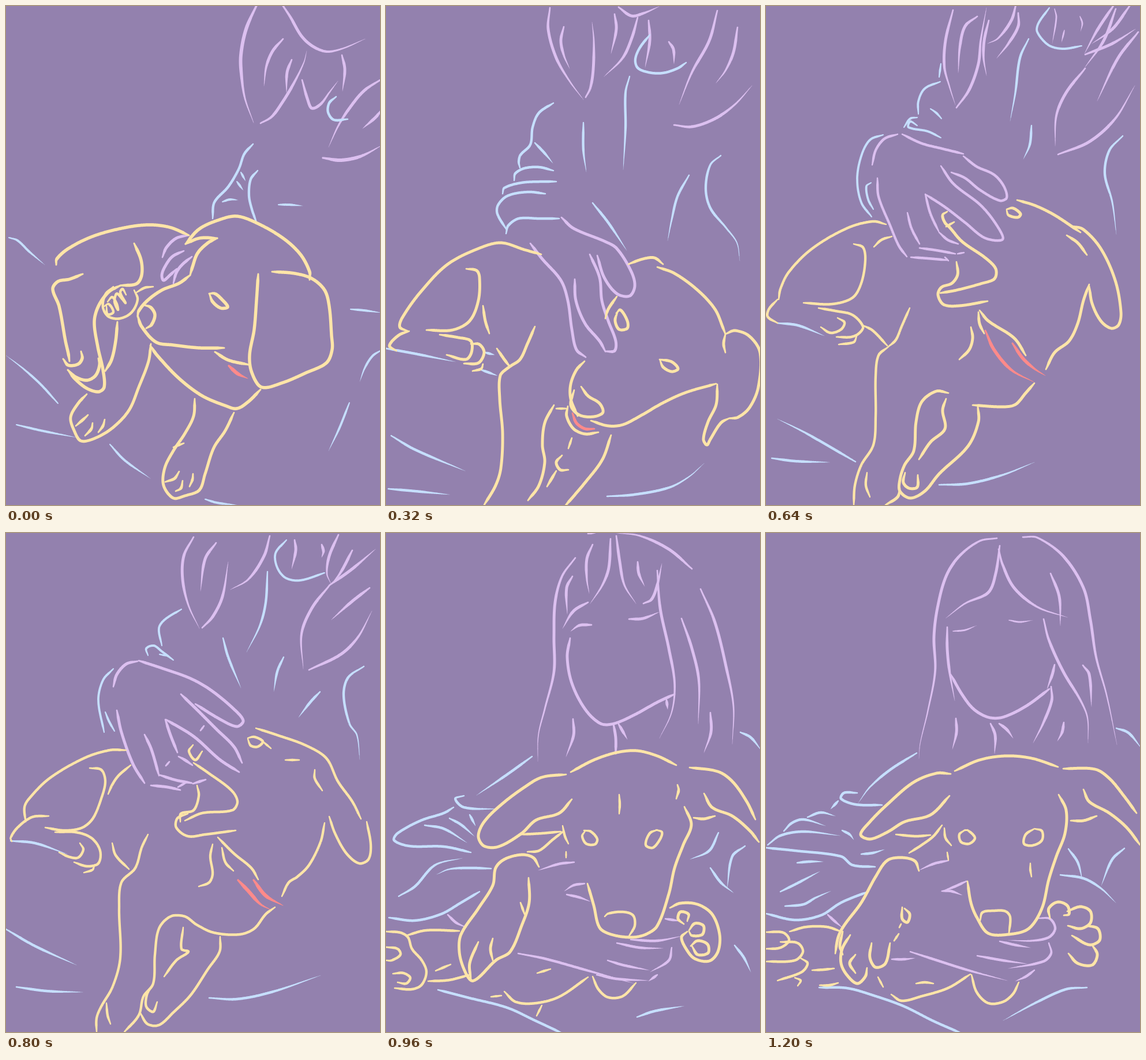
These frames come from a looping animation (648x864 px, 1.28 s). An HTML page with a canvas:

```html
<!DOCTYPE html>
<html lang="en">
<head>
<meta charset="utf-8">
<title>Dog and owner</title>
<style>
html, body { margin: 0; width: 100%; height: 100%; overflow: hidden; background: #9381ae; }
canvas { display: block; width: 648px; height: 864px; }
</style>
</head>
<body>
<canvas id="stage" width="648" height="864"></canvas>
<script>
const ctx = document.getElementById('stage').getContext('2d');
const STEP = 80, STEPS = 16;
let boil = 0; // redraw wobble, 0 = steady

// Slight line boil so held poses feel redrawn
const wob = ([x, y]) => boil
  ? [x + 1.5 * Math.sin(y / 60 + boil * 2.1), y + 1.5 * Math.sin(x / 70 + boil * 3.7)]
  : [x, y];

// Smooth curve through the points, sampled about once per pixel
function curve(nums) {
  const p = [], out = [];
  for (let i = 0; i < nums.length; i += 2) p.push(wob([nums[i], nums[i + 1]]));
  const dist = (a, b) => Math.hypot(b[0] - a[0], b[1] - a[1]) || 1;
  const tangent = i => {
    const a = p[Math.max(i - 1, 0)], b = p[i], c = p[Math.min(i + 1, p.length - 1)];
    const d = (a === b ? 0 : dist(a, b)) + (b === c ? 0 : dist(b, c));
    return [(c[0] - a[0]) / d, (c[1] - a[1]) / d];
  };
  for (let i = 0; i < p.length - 1; i++) {
    const d = dist(p[i], p[i + 1]), m = tangent(i), n = tangent(i + 1), k = Math.ceil(d);
    for (let j = 0; j < k; j++) {
      const t = j / k, t2 = t * t, t3 = t2 * t;
      out.push([0, 1].map(c =>
        (2 * t3 - 3 * t2 + 1) * p[i][c] + (t3 - 2 * t2 + t) * d * m[c] +
        (3 * t2 - 2 * t3) * p[i + 1][c] + (t3 - t2) * d * n[c]));
    }
  }
  out.push(p[p.length - 1]);
  return out;
}

// Brush: tail = 1 thins out toward the end, tail = 0 stays even
const brush = color => (width, tail, ...strokes) => {
  ctx.fillStyle = color;
  for (const s of strokes) {
    const pts = curve(s), n = pts.length - 1;
    ctx.beginPath();
    pts.forEach(([x, y], i) => {
      const left = n - i;
      const head = 0.55 + 0.45 * Math.min(1, i / (tail ? 1 + n * 0.2 : 12));
      const end = tail
        ? 0.15 + 0.85 * Math.min(1, left / (1 + n * 0.45))
        : 0.55 + 0.45 * Math.min(1, left / 12);
      const r = width / 2 * Math.min(head, end);
      ctx.moveTo(x + r, y);
      ctx.arc(x, y, r, 0, 7);
    });
    ctx.fill();
  }
};
const gold = brush('#ffe5a8'), lilac = brush('#dcc0f0'), blue = brush('#c6dfff'), red = brush('#ff8a8a');

function resting() {
  // hair and chin
  lilac(6, 1, [436,-5,416,40,407,85,408,120,414,160,429,202], [549,263,580,267,615,260,650,242]);
  lilac(5, 1, [476,-6,492,18,512,52,532,70,556,79,585,73,622,57], [480,57,462,78,451,105,447,138],
    [495,93,487,115,486,150], [441,203,460,192,478,168,498,135,516,98,521,78],
    [513,128,522,160,530,177,545,170,560,150,575,130], [582,85,587,110,583,147],
    [650,127,620,147,595,177,576,207,559,244], [650,181,640,193,618,212]);
  // fingers
  lilac(5, 0, [316,397,295,402,278,418,271,435], [308,424,288,434,275,452,270,466,273,475,284,466,296,455],
    [322,434,305,448,295,462,290,480]);
  blue(4.5, 0, [428,239,413,256,403,283,385,313,361,340,358,368], [436,285,424,300,421,328,426,352,434,375],
    [572,157,560,168,558,184,568,197,592,196]);
  blue(4, 1, [407,288,415,303], [400,304,411,319], [375,339,388,335,402,336], [472,344,490,344,514,346],
    [5,401,20,406,40,425,67,448], [597,525,620,527,650,531], [650,596,635,606,622,626,613,650],
    [595,687,578,730,559,770], [90,688,60,655,30,628,0,605], [18,725,60,735,122,747],
    [180,759,205,786,250,818], [345,854,365,860,400,864]);
  // body and hind leg
  gold(5.5, 0, [87,448,88,438,108,420,150,399,200,385,245,379,283,383,317,397], [222,411,234,440,235,466,226,481,198,484],
    [198,484,178,495,160,520,153,547,159,590,168,630,170,660,160,668,140,662,120,646,108,631],
    [133,464,110,473,90,477,81,490,92,520,103,580,108,602,110,615],
    [99,611,108,622,125,620,132,610,130,598], [107,630,120,642,140,648,155,640,162,622,160,610],
    [193,547,190,580,183,612,172,632]);
  gold(4.5, 0, [222,492,228,508,218,530,198,541,178,538,168,522,172,500,186,486],
    [170,520,178,516,186,530,176,534,174,520],
    [176,512,184,504,192,516,194,526,188,512,192,498,202,508,207,514,198,496,202,490,208,500],
    [226,496,240,488,255,486]);
  // head
  gold(5.5, 0, [311,412,335,386,370,370,400,364,435,376,480,402,510,430,526,460,526,474],
    [311,412,335,402,366,402], [366,402,350,410,332,428,323,452,319,466],
    [319,466,300,480,270,492,245,510,230,528,228,538], [240,518,251,522,258,535,252,552,243,558],
    [228,536,235,555,260,582,290,587,335,592,378,592],
    [352,498,362,498,374,508,384,521,372,523,358,512,353,500]);
  gold(5.5, 0, [437,464,434,510,430,560,422,605,426,635,443,660,480,652,520,635,555,618,565,595,564,570,560,520,552,492,530,472,500,463,461,460],
    [362,599,385,613,420,621], [250,588,262,605,300,645,340,675,380,692,400,697,420,685,441,664]);
  // front legs
  gold(5, 0, [251,585,247,615,230,660,213,700,185,730,155,748,130,753,118,735,112,712,125,688,140,672],
    [121,727,138,712,142,708], [137,744,148,732,150,722], [160,738,168,727,171,716],
    [327,680,325,710,310,740,290,770,275,800,273,830,290,852,310,848,335,838,345,810,360,765,380,735,395,704],
    [290,764,308,757], [276,824,292,818,300,806], [294,840,303,835,306,822], [318,832,323,820,324,810]);
  red(6, 1, [386,623,402,637,419,645]);
}

function petA() {
  lilac(5, 1, [284,3,281,40,295,90,318,130,342,162], [308,36,303,60,308,85,318,108],
    [346,158,354,142,359,110,360,60,357,28], [396,14,399,40,390,82], [436,20,426,55,410,90,378,122],
    [403,2,425,17,445,13,473,1], [455,25,457,60,449,106], [490,62,498,75,499,100],
    [574,8,560,60,530,115,508,170], [609,37,602,80,588,112,572,133], [499,206,530,209,570,195,605,170,634,138]);
  // hand
  lilac(5, 0, [304,366,325,385,380,408,400,420,425,460,431,485,422,502,400,498,378,470,366,432],
    [353,430,370,470,374,510,385,545,398,580,396,597,380,598], [327,473,329,510,345,550,370,580,380,598],
    [250,411,270,437,303,475,315,510,322,560,330,595,346,608]);
  // sleeve
  blue(4.5, 0, [290,168,265,185,254,210,250,240,233,258,230,270,232,280], [222,302,224,290,240,281,265,279,290,285],
    [202,325,205,315,235,306,270,304,295,304], [276,325,245,322,210,329,194,345,193,360,208,386],
    [208,394,212,380,230,368,265,368,300,368], [457,50,440,72,432,92,436,107,455,115,480,116,505,108,520,98]);
  blue(4.5, 1, [258,237,275,255,289,272], [342,202,342,250,347,287], [422,122,415,150,415,210,411,283],
    [358,341,385,375,417,423], [525,293,505,330,495,370,488,406],
    [580,259,562,275,554,315,562,350,590,385,608,410,613,441], [-5,592,50,602,120,616], [172,600,188,604],
    [165,630,193,640], [9,744,50,768,137,805], [4,836,50,840,110,846], [383,849,430,846,490,834,525,815,551,792]);
  // body
  gold(5, 0, [269,430,240,422,200,410,165,418,107,447,60,495,28,540,24,556,38,563], [40,563,22,570,6,588,18,597],
    [139,455,157,458,162,470,160,510,145,545,115,561,70,561], [93,569,125,574,147,580,148,600,138,612,105,604],
    [147,585,162,586,170,600,160,618,135,619], [150,632,165,628,168,620], [168,519,172,545,179,567],
    [192,593,205,612,215,625], [258,555,245,585,232,612,212,626,198,640,197,680,202,740,199,800,190,830,170,864]);
  // head
  gold(5, 0, [380,541,385,525,400,503], [420,447,445,438,465,436,480,447], [470,452,500,463,540,492,570,525,585,560,588,568],
    [588,568,605,562,630,572,648,600,645,660,630,695,610,712,594,714], [588,568,585,585,588,600],
    [594,714,580,722,562,750,556,760,550,750,558,720,572,690,574,655],
    [572,654,520,669,480,687,440,710,410,725,385,727,355,718],
    [399,532,406,526,418,545,418,558,404,560,397,545,401,530], [474,612,495,616,506,628,495,633,480,625,475,614]);
  gold(5, 0, [344,615,330,630,320,655,320,680,332,710],
    [338,659,350,675,370,688,376,703,365,710,345,711,330,705,320,690,326,665],
    [315,693,313,710,325,732,345,741,368,738], [295,697,312,697], [291,691,275,722,271,760,275,790,265,830,246,856],
    [390,743,375,785,345,825,310,866], [322,748,316,766], [305,778,295,790,302,803,316,803], [295,805,286,820,279,832]);
  red(5, 0, [323,705,330,722,345,732,361,732]);
}

function petB() {
  lilac(5, 1, [287,-2,273,35,272,80,285,130,304,163], [328,25,313,45,309,70,312,98], [319,167,345,135,358,100,359,42],
    [362,117,390,105,410,70,423,35], [403,-2,425,17,445,18,482,5], [452,22,458,60,453,99], [504,42,504,55,497,72],
    [566,18,555,65,520,125,480,185,473,222], [605,65,595,105,565,138], [483,223,530,223,590,195,630,148]);
  // hand
  lilac(5, 0, [307,375,325,384,352,404], [364,404,395,417,420,448,427,480,418,500,398,500,370,465,344,422],
    [327,455,321,490,340,540,362,580,385,596,396,585,380,545,369,500,373,470],
    [251,411,280,438,300,475,315,520,328,570,333,588,352,598]);
  // sleeve
  blue(5, 0, [286,153,280,175,258,205,250,225,258,245,287,261], [250,236,238,245,240,258,260,268,289,273],
    [236,262,230,270,240,282,265,289,285,290], [230,280,222,295,220,305],
    [270,305,235,306,205,320,191,340,200,362,212,378], [214,402,208,385,220,367,250,363,312,363],
    [262,322,285,321,303,333], [244,336,230,343,222,358], [437,62,412,80,405,100,415,120,435,131,470,124,510,105,540,75]);
  blue(5, 1, [295,224,306,260,305,290,298,324], [368,255,354,275,353,320,371,374], [410,137,414,180,415,260,408,331],
    [568,298,562,325,575,355,598,400,604,482], [507,365,485,375,472,395,463,420], [0,735,40,750,148,810],
    [0,832,50,842,132,844], [363,847,410,856,470,850,520,830,567,794], [15,595,50,600,95,614], [100,617,145,631],
    [172,609,202,616], [165,640,195,648]);
  // body
  gold(5, 0, [257,420,205,410,170,414,120,438,82,461,50,505,30,535,26,555], [82,542,60,547,35,550,10,575,4,590,14,595],
    [150,460,165,475,160,510,148,550,125,560,90,563,66,567], [70,567,105,570,140,575,148,595,138,612,100,612],
    [148,580,165,585,176,600,165,617,135,620], [158,620,174,615,176,630,165,640,150,637], [188,597,200,612,215,622],
    [258,547,245,585,228,615,205,633,199,655,207,700,206,770,195,820,172,864]);
  // head
  gold(5, 0, [411,451,430,438,460,436,485,450,475,451], [470,453,500,460,540,485,570,520,590,562],
    [577,566,600,563,622,578,632,605,625,660,615,690,588,712],
    [575,630,572,650,579,685,570,710,555,740,554,758,562,752,570,735,585,727],
    [563,659,520,670,480,690,440,715,400,730,370,732,345,728],
    [400,531,396,548,408,562,422,557,418,540,404,528], [503,634,485,630,468,615,483,610,498,620,504,628]);
  gold(5, 0, [345,607,328,630,317,660,320,690,330,710], [330,660,350,670,365,690,380,708,372,715,345,712,326,695,324,668,330,660],
    [315,697,313,712,325,733,345,742,366,737], [313,697,290,700,278,715,277,760,273,800,260,830,248,858,264,848],
    [324,745,322,770,305,785,302,797,312,800], [302,797,285,805,272,830,268,850,274,862], [391,743,375,785,345,825,310,866]);
  red(5, 0, [323,707,332,720,348,726]);
}

function playA() {
  lilac(5, 1, [324,7,311,60,309,105,318,140,328,171], [366,18,345,35,336,70,333,115], [330,176,352,145,368,100,372,60,382,3],
    [386,25,378,60,377,90,382,120], [433,-2,425,25,402,56,384,65], [437,12,437,35,420,65,400,90],
    [603,-2,575,40,552,82], [630,0,600,40,565,65], [553,84,600,65,640,40], [606,5,585,60,552,107],
    [553,108,520,150,503,190,501,242], [645,45,610,90,574,164], [506,257,560,235,605,195,639,138]);
  lilac(3, 1, [500,5,503,20,496,65], [517,42,512,63], [544,18,548,30,545,44]);
  // hand
  lilac(4.5, 0, [184,275,190,250,205,230,228,222], [236,222,270,238,305,247,342,256],
    [342,260,365,278,395,292,412,312,417,332,405,337,370,318,345,298,321,288],
    [303,277,325,308,372,345,400,380,410,404,380,402,345,375,310,348,276,326], [276,326,285,360,299,390],
    [193,298,195,330,215,380,230,415,244,434], [245,358,252,385,266,412], [251,435,280,437,314,440],
    [266,419,295,423,328,429], [300,392,315,405,333,412], [332,429,343,427], [310,435,316,441]);
  blue(4, 0, [303,100,300,123], [302,131,275,143,264,165,264,187], [239,210,250,195,262,193],
    [262,207,250,200,247,210,280,217,303,228], [285,178,295,185,304,195], [203,223,180,232,165,260,158,300,165,340,183,365],
    [182,306,174,312,177,335,186,352], [491,3,472,30,470,45,490,68,515,74,547,69]);
  blue(4.5, 1, [455,57,440,90,432,150,423,199], [460,207,457,240,446,265], [618,225,595,250,587,290,600,340,607,395],
    [20,549,55,553,101,571], [155,789,70,740,20,715], [10,783,50,788,110,790], [300,829,350,827,410,812,465,790]);
  // body
  gold(4.5, 0, [208,378,185,373,140,385,80,420,40,460,25,490,22,508], [20,508,5,525,3,538,20,549],
    [152,412,168,418,172,440,165,480,150,505,115,516,65,514], [91,523,120,528,150,535,168,555,162,566,148,573,122,573],
    [124,540,136,548,130,560,112,566,95,556], [157,572,152,582,126,586], [218,399,200,405,187,417],
    [249,523,235,555,225,578,212,590], [168,553,185,562,210,588],
    [212,590,195,605,190,640,190,710,186,760,165,795,154,830,152,864], [175,808,173,830,180,850]);
  // head
  gold(5, 0, [435,336,465,345,500,362,545,392], [530,381,550,387,580,420,605,475,615,530,611,552,598,558,580,545,565,515,560,485],
    [521,397,540,410,556,431], [560,482,550,510,540,550,525,580,500,600,485,629], [417,352,428,350,441,360,436,366,420,362,417,354],
    [314,356,306,362,310,375,318,383,340,408,380,436,398,455,396,472,375,480,330,492,302,497], [312,382,326,374],
    [330,443,332,465,322,480,304,487,298,500,308,517,335,519,384,511],
    [370,527,385,545,430,575,450,605], [368,530,370,550,378,567], [355,556,358,575,352,595,335,612]);
  // front legs
  gold(5, 0, [465,653,450,670,432,690,410,694,358,691],
    [316,670,295,667,270,685,260,720,256,770,240,795,232,820,232,840,250,852,275,840,300,810,350,762,368,720,367,693],
    [312,680,306,700,310,732,285,755,265,785], [241,808,238,825,248,835,262,833,263,812], [232,835,228,850,207,864]);
  red(5.5, 1, [380,562,395,595,425,630,464,651], [427,584,445,610,465,628,484,640]);
}

function playB() {
  lilac(5, 1, [325,7,308,40,306,80,316,125,335,165], [364,17,345,45,337,100], [340,164,358,145,375,110,385,50],
    [457,5,447,40,420,80,389,98], [500,12,502,30,495,62], [547,20,550,32,547,42], [576,3,560,40,556,70,563,88],
    [600,30,580,68,563,90], [561,90,600,62,640,28], [561,90,530,130,512,175,515,235], [630,95,600,118,564,150],
    [525,237,580,210,610,180,634,135]);
  // hand
  lilac(5, 0, [186,266,192,245,208,227,228,222],
    [230,221,270,234,320,252,355,272,395,305,411,325,400,335,370,322,328,296],
    [303,279,330,305,365,340,395,370,409,398], [404,414,370,392,325,352,277,323], [276,323,285,350,297,380],
    [192,307,200,345,220,400,240,433], [240,349,252,375,265,420], [251,437,280,440,302,445], [266,419,295,428,322,433],
    [299,387,310,393,323,402], [298,440,312,432], [343,334,337,342], [283,396,277,403], [324,434,346,427]);
  blue(4, 0, [304,132,275,150,265,165,270,195], [246,212,243,200,256,195,270,205,290,220], [266,210,280,213],
    [186,235,168,255,160,290,170,345], [172,310,178,325,188,343], [486,12,467,35,470,60,485,78,510,82,552,69]);
  blue(4.5, 1, [453,67,450,120,440,160,417,206], [376,182,385,215,407,268], [481,215,470,240,464,274], [544,275,528,292,507,319],
    [620,231,593,250,585,280,595,330,608,350,613,392], [8,533,50,537,106,556], [0,686,50,715,122,748],
    [18,786,70,793,133,795], [352,805,400,807,460,795,545,766]);
  // body
  gold(4.5, 0, [208,376,180,376,135,390,75,425,40,460,32,475,34,500], [74,490,45,492,20,510,8,528,10,534],
    [145,407,165,410,172,430,165,460,150,495,130,511,100,515,68,510], [85,518,120,518,148,528,163,550,160,572,140,577,118,570],
    [128,537,134,548,125,562,110,561,92,553], [153,575,150,583,135,588], [216,402,195,420,184,436,177,452],
    [184,537,190,558,213,582],
    [246,522,235,545,224,580,200,605,196,650,198,735,185,785,165,820,157,840,157,864], [174,814,176,835,181,850]);
  // head
  gold(4.5, 0, [433,338,470,350,520,368,555,390,575,430,600,465,615,495],
    [419,355,430,353,445,361,436,370,424,368,419,357], [445,361,459,373], [484,393,508,393], [535,410,535,425,548,446],
    [560,491,570,520,590,555,612,572,628,565,632,540,625,500], [552,502,545,535,525,575,505,595,490,605,478,629],
    [325,398,350,415,390,445,401,465,392,480,340,485,310,498], [324,367,317,378,328,393,340,378],
    [331,437,334,455,325,480,303,486,302,500], [315,486,297,494,295,510,315,525,345,522,398,515],
    [367,527,395,555,425,580,437,600], [374,545,380,570,394,585], [358,539,354,560,358,590,352,605,334,612]);
  // front legs
  gold(4.5, 0, [466,648,450,660,430,685,405,695,360,692,330,678,310,664,285,664,265,685,258,730,255,780,238,803,230,835,205,864],
    [371,699,370,725,350,755,320,800,290,830,265,852,245,850,232,830], [307,683,304,720,316,725,295,740,274,768],
    [252,785,244,800,243,820,255,829,262,812]);
  red(6, 1, [402,601,420,620,440,642,458,652], [429,601,450,628,480,645]);
}

function hugA() {
  // hair
  lilac(5, 1, [350,1,372,-4], [530,62,490,28,440,5,400,0], [328,43,305,75,293,120,291,180,291,240,275,305,264,350,263,395],
    [323,75,313,95,314,140], [358,20,348,45,348,80,352,104], [389,10,386,60,375,90,354,122], [399,5,405,50,413,90,433,122],
    [436,50,438,70,448,92], [446,122,460,115,470,90,478,53], [350,120,325,135,306,165], [356,159,335,160,320,170],
    [421,149,445,148,473,137]);
  lilac(5, 1, [470,65,475,130,490,200,500,260,495,310,474,355], [512,148,530,200,542,255,541,330],
    [545,97,570,155,590,235,602,300,600,365], [324,322,325,350,312,387], [562,311,563,345,551,380],
    [403,331,410,343,418,357], [486,289,488,305]);
  lilac(5, 0, [319,182,314,215,322,260,345,305,372,330,395,330,430,315,470,293,500,279], [394,330,398,355,398,382]);
  // arms
  lilac(4.5, 1, [326,570,300,573,264,584], [344,607,325,610,309,620], [313,626,335,631,354,638], [107,661,122,675,140,683],
    [229,728,275,737,340,755,430,780], [365,765,400,772,455,775], [384,740,410,748,456,757], [400,710,440,718,480,719],
    [424,704,470,706,512,698], [484,668,510,672], [495,718,490,740,458,760], [470,765,455,776]);
  blue(4.5, 1, [253,387,210,418,157,454], [135,455,120,460,135,475,193,478], [67,506,100,512,140,536], [110,494,130,505,153,525],
    [145,488,155,507], [22,629,50,612,85,575,132,563], [182,581,145,580,110,582,88,591], [614,345,632,354,650,376],
    [576,519,560,550,527,565], [562,580,580,605,602,623], [622,542,600,560,591,615], [604,714,620,735,632,760], [435,838,465,828,516,819]);
  blue(4.5, 0, [117,475,100,485,60,498,20,520,14,532,40,542,100,543,147,553], [5,666,50,671,95,660,130,640,162,621],
    [90,791,140,804,210,822,260,845,305,866]);
  // head
  gold(5, 0, [320,414,360,393,400,380,435,377,470,386,503,402],
    [312,418,270,423,240,440,200,470,170,500,160,525,170,542,195,543,235,520,260,497,300,485,322,461],
    [526,406,575,413,600,430,625,465,640,496], [551,451,565,475,600,490,630,515,646,535],
    [505,436,507,445,503,460], [533,493,550,495,570,490],
    [517,474,529,505,515,540,500,580,490,625,470,680,450,695,425,700,390,695,370,683,360,645,349,607]);
  gold(4.5, 0, [404,453,405,470,404,486], [345,516,340,525,347,538,362,539,366,530,355,517,343,515],
    [470,514,457,520,450,540,462,545,475,530,478,518,468,514], [379,664,385,659,410,656,428,662,431,680,421,698],
    [306,507,310,525,316,538], [312,552,312,562], [233,522,270,520,303,517], [308,516,290,530,265,550,245,552]);
  // paws
  gold(5, 0, [265,578,255,562,235,557,205,565,190,580,185,610,160,650,130,695,127,725,135,755,148,775,160,770,190,740,215,725,235,680,248,640,247,597],
    [147,773,145,745,160,708], [185,740,181,720,185,702], [240,660,233,640],
    [492,649,510,641,540,643,565,660,578,695,575,725,560,741,535,737,520,720,512,700,522,690],
    [516,677,506,668,510,656,524,660,522,672], [525,688,535,676,550,680,548,695,530,697,525,690],
    [528,715,540,706,557,712,558,727,540,730,530,715]);
  gold(4.5, 0, [35,697,70,688,127,689], [0,690,25,692,38,700,45,720,62,740,70,760,62,782,45,790,15,788],
    [0,717,20,720,25,730,10,740,0,740], [12,763,30,762,42,770,35,780,20,778], [73,776,110,774,145,765], [86,758,112,747],
    [205,794,225,812,260,814,300,803,350,769], [182,803,200,801], [262,762,285,755], [270,818,261,836],
    [358,768,368,790,385,804,410,802,433,779]);
}

function hugB() {
  // hair and face
  lilac(5, 1, [400,9,370,14,335,40,312,75,297,130,291,180,293,240,280,310,267,365,265,390],
    [445,7,470,8,515,40,550,95,562,150,572,215,590,280,608,366], [405,22,398,70,385,103,345,122,312,147],
    [403,28,410,55,430,95,470,128,522,146], [493,70,508,110,510,160], [314,163,314,200,318,240,327,290],
    [481,149,490,185,515,240,545,290,557,320,558,363], [500,228,496,245,487,270], [494,266,495,290,480,330,463,363]);
  lilac(5, 1, [549,229,560,245,564,300], [516,328,513,345,505,360], [329,321,330,345,323,374], [389,330,397,350,396,382],
    [404,330,417,340,428,355]);
  lilac(3, 1, [324,170,345,168,365,160], [421,151,440,154,462,151]);
  lilac(5, 0, [320,245,340,280,360,305,385,319,410,319,450,300,491,270]);
  // arms
  lilac(4.5, 1, [316,567,290,573,265,584], [347,603,325,613,303,621], [305,620,320,620,340,627], [107,661,120,673,132,683],
    [218,738,240,738,258,736], [250,725,290,738,350,757,418,775], [366,732,410,740,453,746], [405,707,430,713,458,718],
    [472,667,492,668,501,685,490,700,460,706,420,705], [490,710,494,728,480,742,420,754], [465,757,450,768,432,776]);
  blue(4.5, 1, [261,381,215,410,180,440,160,467], [125,464,112,478], [72,492,95,484,120,490], [31,516,45,502,65,496,103,507],
    [3,540,25,524,65,517,128,524], [132,515,145,522,152,531], [165,556,185,554,205,548], [54,571,75,569,99,569],
    [25,621,55,606,93,586], [33,646,65,643,85,632,112,620], [607,338,628,346,650,372], [524,547,540,570,548,600],
    [621,546,600,565,581,610], [510,592,550,598,580,615,606,640], [556,787,520,790,470,812,411,844]);
  blue(4.5, 0, [158,450,135,450,130,460,155,470,201,471], [0,545,50,550,130,560,150,575,189,578],
    [0,659,50,670,95,662,130,640,177,621], [92,787,140,788,190,802,240,820,290,845,338,866]);
  // head
  gold(5, 0, [327,412,370,393,415,386,460,390,506,405],
    [320,417,295,416,255,432,210,470,180,500,164,522,180,530,210,518,240,500,285,488,318,455],
    [515,408,570,409,595,425,620,455,642,485], [550,444,560,465,595,485,625,510,648,540],
    [507,453,520,480,518,520,503,560,490,600,478,650,455,685,420,695,385,693,365,665,355,640,349,603],
    [528,498,550,498,573,490]);
  gold(4.5, 0, [345,514,335,522,338,535,352,538,362,528,350,515,343,515], [465,512,450,522,447,538,462,541,478,532,478,516,465,512],
    [458,572,458,583,460,595], [371,671,375,657,395,654,415,655,423,665,421,693], [309,511,311,528,321,541],
    [314,553,316,566], [225,522,260,525,285,523], [305,506,290,525,270,540,248,554]);
  // paws
  gold(5, 0, [265,585,258,568,235,562,210,567,190,595,165,640,135,680,125,700,120,728], [133,690,128,715,133,730],
    [146,696,132,720,130,745,140,765,158,780,172,768,175,753], [155,730,145,745,155,762],
    [183,710,180,735,190,752,207,745,215,710], [230,694,222,706], [234,677,231,683], [236,648,236,668,245,674,249,660,240,650],
    [492,667,490,650,505,639,522,645,525,660,516,662], [522,655,545,647,562,655,562,675,545,685,523,680],
    [555,680,575,685,578,705,560,713,530,697], [565,713,574,730,565,748,540,745,524,728]);
  gold(4.5, 0, [41,690,70,682,105,682,130,690], [0,691,30,692,40,705,25,718,0,720], [25,708,55,710,64,725,50,740,0,742],
    [60,736,72,745,62,760,20,775], [50,770,60,775,55,784], [80,757,100,756,118,754], [93,783,110,783,125,779],
    [194,769,203,786], [217,799,235,810,270,802,315,788,354,764], [260,780,275,778,290,780],
    [356,765,365,795,385,814,410,812,428,798,438,778]);
}

// Pose and the steps it is held for
const poses = [[resting, 4], [petA, 2], [petB, 2], [playA, 2], [playB, 2], [hugA, 2], [hugB, 2]];
const steadyLast = hugB; // this pose settles on its last step
const timeline = poses.flatMap(([pose, n]) =>
  Array.from({ length: n }, (_, i) => [pose, pose === steadyLast ? n - 1 - i : i]));

let shown = -1;
const start = performance.now();
function tick() {
  const step = Math.floor((performance.now() - start) / STEP) % STEPS;
  if (step !== shown) {
    shown = step;
    const [pose, wobble] = timeline[step];
    boil = wobble;
    ctx.fillStyle = '#9381ae';
    ctx.fillRect(0, 0, 648, 864);
    pose();
  }
  requestAnimationFrame(tick);
}
tick();
</script>
</body>
</html>
```
